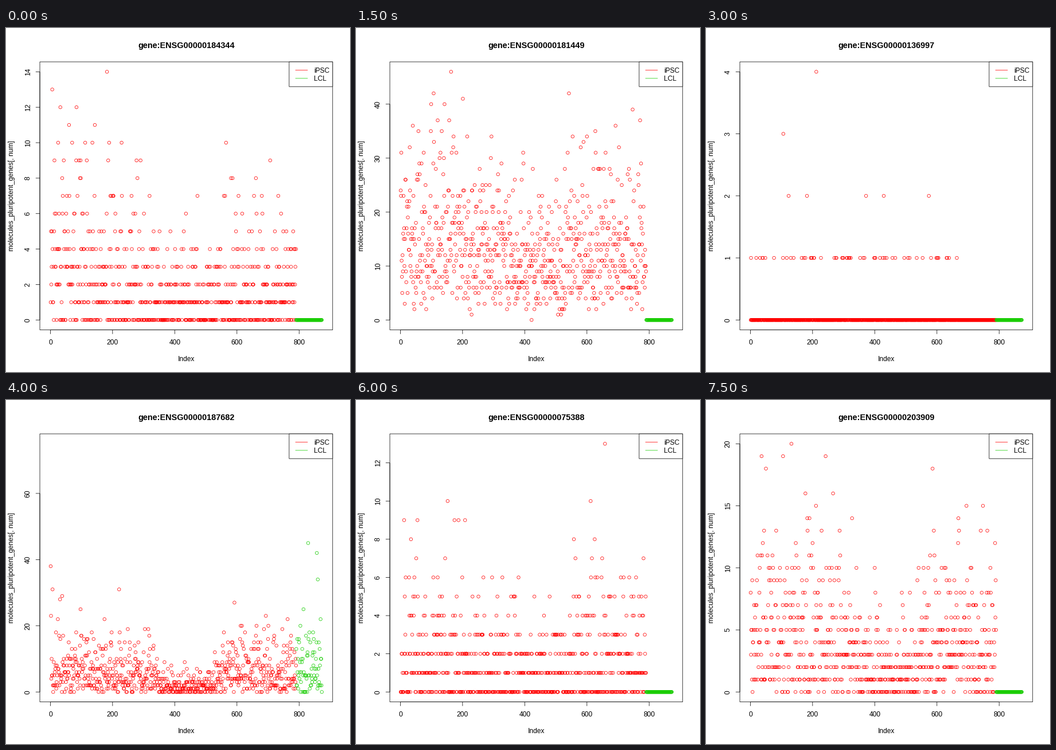
These frames come from a looping animation (600x600 px, 8000 ms). A matplotlib script:

```python
import numpy as np
import matplotlib.pyplot as plt
from matplotlib.animation import FuncAnimation
from matplotlib.patches import Rectangle

SIZE, DPI = 600, 100
PT = 72 / DPI  # points per pixel
EM = 14.4      # one margin line
LW = .75
LEFT, RIGHT = 4.1 * EM, SIZE - 2.1 * EM
TOP, BOTTOM = 4.1 * EM, SIZE - 5.1 * EM
MID_X, MID_Y = (LEFT + RIGHT) / 2, (TOP + BOTTOM) / 2
RED, GREEN = "#ff0000", "#1acd05"
N_IPSC, N_LCL = 790, 83
N_ALL = N_IPSC + N_LCL

plt.rcParams["font.family"] = "Liberation Sans"

cell = np.arange(1, N_ALL + 1)
edge = [RED] * N_IPSC + [GREEN] * N_LCL
slides = []


def window(x, a, b, soft=8):
    """Smooth plateau of height 1 between a and b."""
    return (np.tanh((x - a) / soft) - np.tanh((x - b) / soft)) / 2


def add(gene, top, peak, mean, size, early=0, dip=0, hump=0, lcl=0, end=N_ALL):
    """Draw over-dispersed counts for one gene whose maximum sits at peak."""
    rng = np.random.default_rng(100 + len(slides))
    rate = mean * (1 + early * window(cell, -50, 205))
    rate *= 1 - dip * window(cell, 340, 535)
    rate *= 1 + hump * np.exp(-((cell - 235) / 30) ** 2)
    rate = np.where(cell > end, 0, rate)
    rate = np.where(cell > N_IPSC, lcl, rate)
    shape = np.where(cell > N_IPSC, 1.3, size)
    y = rng.poisson(rng.gamma(shape, rate / shape))
    cap = max(top - 1, 1)
    y = np.clip(np.where(y > cap, 2 * cap - y, y), 0, top)
    y[peak - 1] = top
    slides.append((gene, y, *((0, top) if top else (-1, 1))))


add("00000184344", 14, 182, 2, 1.8, early=.7, dip=.45)
add("00000111704", 31, 139, 8, 2.5, early=.2, dip=.4)
add("00000148200", 128, 240, 43, 7, early=.12, hump=.4, lcl=.6)
add("00000181449", 46, 163, 14, 4, early=.15, dip=.3)
add("00000163530", 52, 204, 16, 4, early=.15, dip=.3, lcl=1.2)
add("00000204531", 68, 537, 31, 6.5, early=.2, dip=.06)
add("00000136997", 4, 212, .1, 1, end=664)
add("00000187140", 1, 664, .02, 1, end=664)
add("00000187682", 75, 835, 6.6, 2, dip=.7, lcl=9)
add("00000164362", 8, 146, 1, 1.2, dip=.3, lcl=.03)
add("00000088305", 6, 375, .6, 1.1)
add("00000184895", 0, 1, 0, 1)
add("00000075388", 13, 658, 1.6, 1.4, early=.4, dip=.3)
add("00000171872", 17, 125, 2.4, 1.8, early=.4, dip=.4)
add("00000179059", 22, 91, 3.7, 2, early=.4, dip=.4)
add("00000203909", 20, 132, 4, 2.2, early=.35, dip=.48)

fig = plt.figure(figsize=(SIZE / DPI, SIZE / DPI), dpi=DPI, facecolor="white")
ax = fig.add_axes([0, 0, 1, 1])


def line(x, y, color="black", z=2):
    ax.plot(x, y, color=color, lw=LW * PT, snap=False, zorder=z,
            solid_capstyle="butt")


def text(x, y, s, size=12, ha="center", **kw):
    ax.text(x, y, s, fontsize=size * PT, ha=ha, va="baseline",
            rotation_mode="anchor", zorder=6, **kw)


def box(x0, y0, x1, y1, fill, z):
    ax.add_patch(Rectangle((x0, y0), x1 - x0, y1 - y0, fc=fill, ec="black",
                           lw=LW * PT, snap=False, zorder=z))


def scale(v, low, high, a, b):
    """Map low..high onto a..b with a 4% margin at both ends."""
    pad = .04 * (high - low)
    return a + (b - a) * (v - low + pad) / (high - low + 2 * pad)


def to_x(v):
    return scale(v, 1, N_ALL, LEFT, RIGHT)


def nice_step(span):
    """Tick distance of 1, 2, 5 or 10 times a power of ten."""
    rough = span * 1.08 / 5
    base = 10 ** np.floor(np.log10(rough))
    step = base
    for factor, bias in ((2, .8), (5, 1.7), (10, .8)):
        if factor * base - rough < bias * (rough - step):
            step = factor * base
    return step


def draw_axes(low, high):
    xs = np.arange(0, N_ALL, 200)
    for v in xs:
        line([to_x(v)] * 2, [BOTTOM, BOTTOM + EM / 2])
        text(to_x(v), BOTTOM + 1.8 * EM, str(v))
    line(to_x(xs[[0, -1]]), [BOTTOM] * 2)

    step = nice_step(high - low)
    ticks = np.arange(low, high + .04 * (high - low) + 1e-9, step)
    ys = scale(ticks, low, high, BOTTOM, TOP)
    for v, y in zip(ticks, ys):
        line([LEFT - EM / 2, LEFT], [y, y])
        text(LEFT - 1.2 * EM, y, f"{v:.{int(step < 1)}f}", rotation=90)
    line([LEFT] * 2, ys[[0, -1]])


def draw_legend():
    x = RIGHT - 75.9
    box(x, TOP, RIGHT, TOP + 3 * EM, "white", 4)
    for row, (name, color) in enumerate((("iPSC", RED), ("LCL", GREEN)), 1):
        y = TOP + row * EM
        line([x + 10.8, x + 32.4], [y, y], color, 5)
        text(x + 43.2, y + 4.2, name, ha="left")


def draw(i):
    gene, y, low, high = slides[i]
    ax.clear()
    ax.set(xlim=(0, SIZE), ylim=(SIZE, 0))
    ax.axis("off")
    ax.scatter(to_x(cell), scale(y, low, high, BOTTOM, TOP),
               s=(5.4 * PT) ** 2, facecolors="none", edgecolors=edge,
               linewidths=LW * PT, zorder=3)
    box(LEFT, TOP, RIGHT, BOTTOM, "none", 2)
    draw_axes(low, high)
    draw_legend()
    text(MID_X, 34.8, "gene:ENSG" + gene, EM, weight="bold")
    text(MID_X, BOTTOM + 3.8 * EM, "Index")
    text(LEFT - 3.2 * EM, MID_Y, "molecules_pluripotent_genes[, num]",
         rotation=90)
    return ax.get_children()


anim = FuncAnimation(fig, draw, frames=len(slides), interval=500,
                     repeat=True, repeat_delay=0, blit=False)
plt.show()
```
